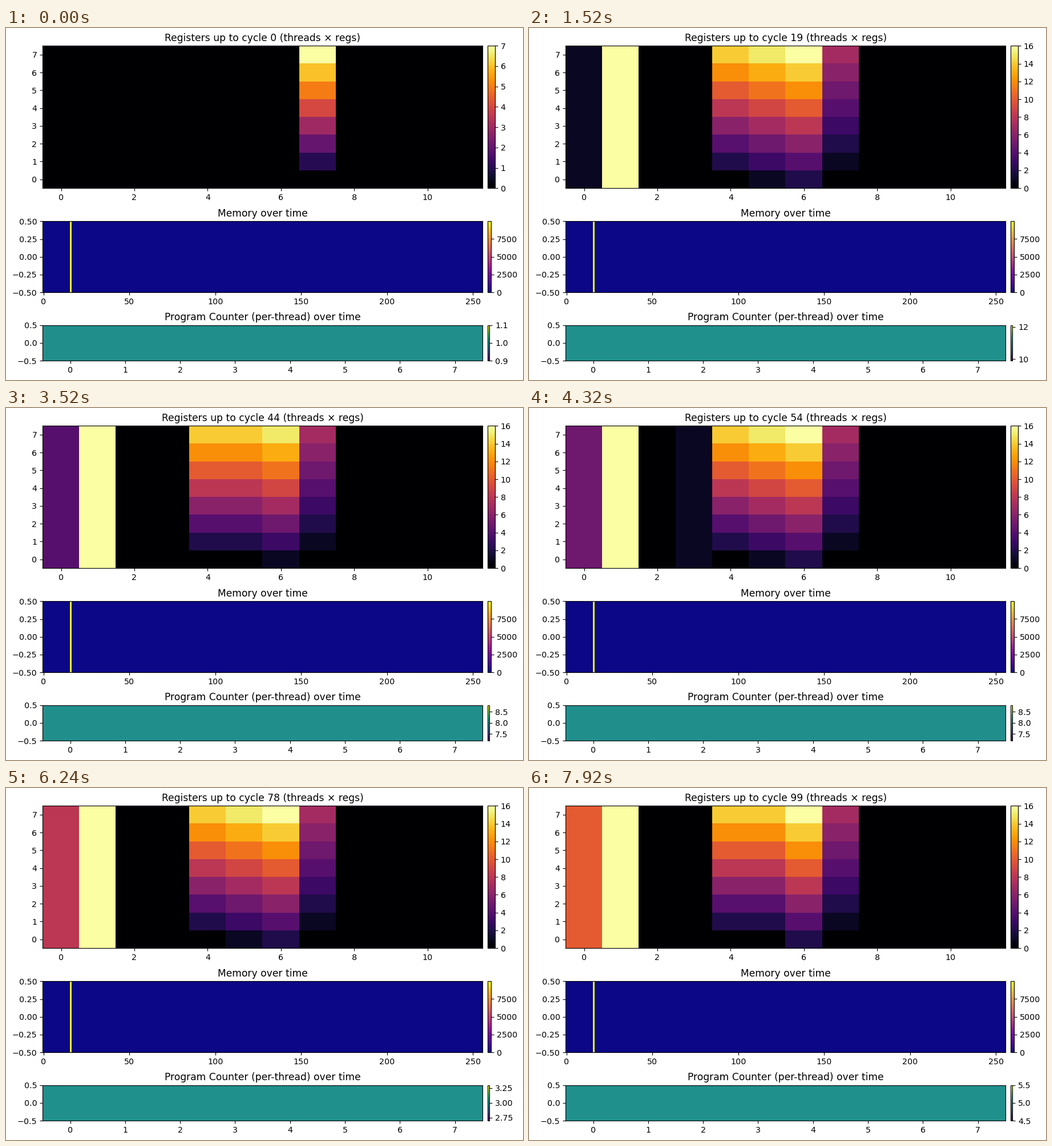
Recreate the animation shown at these times as a matplotlib script. Size 906 by 618 pixels, loop 8 s.

```python
import matplotlib.pyplot as plt
import numpy as np
from matplotlib.animation import FuncAnimation

WIDTH, HEIGHT, DPI = 906, 618, 128
PX = 72 / DPI  # points per pixel
CYCLES, INTERVAL = 100, 80
THREADS, REGS, CELLS = 8, 12, 256

plt.rcParams.update({
    "font.family": "DejaVu Sans",
    "font.size": 14.3 * PX,
    "axes.titlesize": 17.1 * PX,
    "axes.titlepad": 8.3 * PX,
    "axes.linewidth": 1.14 * PX,
})
for side in ("xtick", "ytick"):
    plt.rcParams.update({
        f"{side}.major.size": 5 * PX,
        f"{side}.major.pad": 5 * PX,
        f"{side}.major.width": 1.14 * PX,
        f"{side}.labelsize": 14.3 * PX,
    })

tid = np.arange(THREADS)
LOOP, SKIP_ODD, STEP_ODD, JUMP = 3, 5, 6, 12

# Pairwise exchange sort: address -> (destination register, value)
PROGRAM = {
    0: (7, lambda r: tid),
    1: (1, lambda r: 16),
    2: (4, lambda r: 2 * r[:, 7]),
    3: (3, lambda r: r[:, 0] % 2),
    4: (5, lambda r: r[:, 4]),
    STEP_ODD: (5, lambda r: r[:, 5] + 1),
    7: (6, lambda r: r[:, 5] + 1),
    9: (3, lambda r: 0),
    11: (0, lambda r: r[:, 0] + 1),
}


def simulate():
    """Return (registers, program counter) after each cycle."""
    regs, pc, history = np.zeros((THREADS, REGS)), 0, []
    for _ in range(CYCLES):
        if pc in PROGRAM:
            dest, value = PROGRAM[pc]
            regs[:, dest] = value(regs)
        if pc == JUMP:
            pc = LOOP
        elif pc == SKIP_ODD and regs[0, 3] == 0:
            pc = STEP_ODD + 1
        else:
            pc += 1
        history.append((regs.copy(), pc))
    return history


history = simulate()
memory = np.zeros((1, CELLS))
memory[0, 16] = 9999

fig = plt.figure(figsize=(WIDTH / DPI, HEIGHT / DPI), dpi=DPI, facecolor="white")


def add_axes(left, top, right, bottom):
    return fig.add_axes([left / WIDTH, 1 - bottom / HEIGHT,
                         (right - left) / WIDTH, (bottom - top) / HEIGHT])


def panel(data, top, bottom, cmap, title=""):
    ax = add_axes(64.4, top, 834.9, bottom)
    image = ax.imshow(data, aspect="auto", origin="lower", cmap=cmap,
                      interpolation="nearest")
    heading = ax.set_title(title)
    bar_left, bar_width = 844.1, (bottom - top) / 20
    fig.colorbar(image, cax=add_axes(bar_left, top, bar_left + bar_width, bottom))
    return image, heading


def rescale(image, data):
    # autoscale moves both limits at once, so the colorbar never sees them crossed
    image.set_data(data)
    image.autoscale()


reg_image, reg_title = panel(history[0][0], 31.3, 281.2, "inferno")
panel(memory, 339.3, 464.1, "plasma", "Memory over time")
pc_image, _ = panel(np.ones((1, THREADS)), 521.7, 584.2, "viridis",
                    "Program Counter (per-thread) over time")


def update(cycle):
    regs, pc = history[cycle]
    rescale(reg_image, regs)
    rescale(pc_image, np.full((1, THREADS), float(pc)))
    reg_title.set_text(f"Registers up to cycle {cycle} (threads × regs)")
    return reg_image, reg_title, pc_image


anim = FuncAnimation(fig, update, frames=CYCLES, interval=INTERVAL,
                     repeat=True, repeat_delay=0, blit=False)
plt.show()
```
